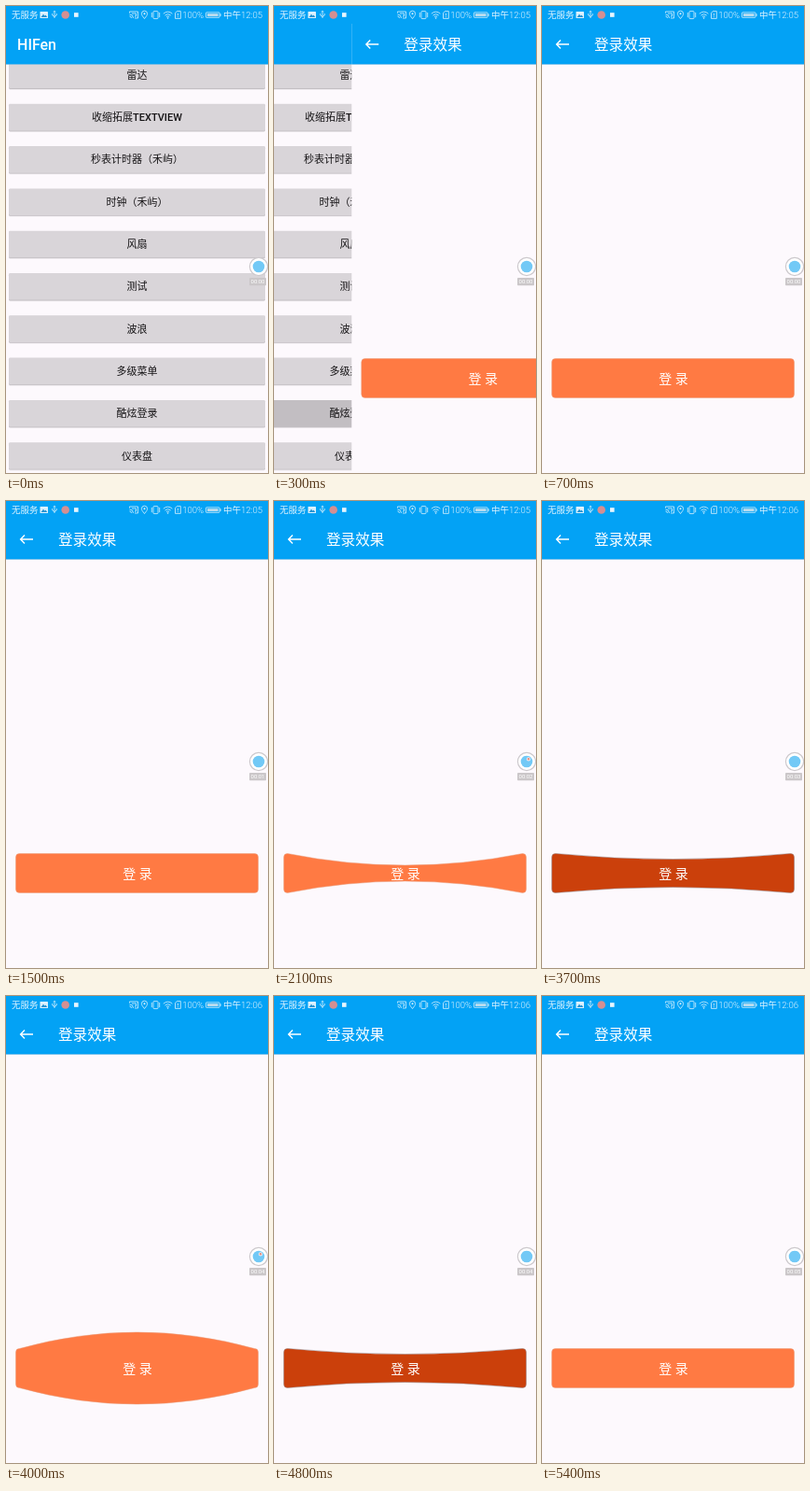
Recreate the animation shown at these times as an HTML page. Size 281 by 500 pixels, loop 5600 ms.

```html
<!DOCTYPE html>
<html lang="zh-CN">
<head>
<meta charset="utf-8">
<title>登录效果</title>
<style>
  html, body { margin: 0; width: 100%; height: 100%; overflow: hidden; background: #fdf9fd; }
  svg { display: block; width: 100vw; height: 100vh; }
  text { font-family: Roboto, "Noto Sans CJK SC", "Noto Sans CJK", sans-serif; fill: #fff; }
  .row { font-size: 11px; font-weight: 500; fill: #161416; text-anchor: middle; }
  .status text { font-size: 9.5px; font-weight: 300; fill: #e3f4fe; }
  .line { fill: none; stroke: #dcf1fd; stroke-width: .8; }
  .solid { fill: #dcf1fd; }
</style>
</head>
<body>
<svg viewBox="0 0 281 500" preserveAspectRatio="none">
  <g id="listPage">
    <rect width="281" height="500" fill="#fdf9fd"/>
    <g id="rows"></g>
    <rect y="62" width="281" height="1" fill="#b9c6d2" opacity=".6"/>
    <rect width="281" height="62.4" fill="#03a2f5"/>
    <text x="12" y="46.5" font-size="16" font-weight="500">HIFen</text>
  </g>

  <g id="loginPage">
    <rect width="281" height="500" fill="#fdf9fd"/>
    <rect y="62" width="281" height="1" fill="#b9c6d2" opacity=".6"/>
    <rect width="281" height="62.4" fill="#03a2f5"/>
    <path d="M29 41H15.8M20 36.6L15.6 41L20 45.4" fill="none" stroke="#fff" stroke-width="1.4"/>
    <text x="56" y="47" font-size="15.6" font-weight="500">登录效果</text>
    <path id="button" stroke-width=".5"/>
    <text x="141" y="404" font-size="14" text-anchor="middle">登 录</text>
  </g>

  <g class="status">
    <rect width="281" height="19" fill="#03a2f5"/>
    <text x="6" y="13">无服务</text>
    <rect class="solid" x="36.5" y="6" width="8.5" height="7" rx=".6"/>
    <path d="M37.5 12L40 8.8L41.6 10.6L42.6 9.6L44.2 12Z" fill="#2593d3"/>
    <path class="line" d="M52 5.5V13M49.8 8V10L52 11.5L54.2 10V8M51 6.5L52 5.2L53 6.5"/>
    <circle cx="63.7" cy="9.5" r="4.3" fill="#d58f92"/>
    <rect x="73" y="7.2" width="4.6" height="4.6" fill="#e6f5fe"/>

    <path class="line" d="M132.5 7.5V6H141.5V13H138M132.5 9a4 4 0 0 1 4 4M132.5 11a2 2 0 0 1 2 2M135 8H139.5V11H138"/>
    <path class="line" d="M148.5 13.6C146.5 11 145.4 9.7 145.4 8.3a3.1 3.1 0 0 1 6.2 0C151.6 9.7 150.5 11 148.5 13.6Z"/>
    <circle class="solid" cx="148.5" cy="8.3" r="1"/>
    <rect class="line" x="158" y="5.6" width="5" height="8" rx=".8"/>
    <path class="line" d="M156.3 7V12.2M164.7 7V12.2"/>
    <path class="line" d="M168.8 8.2Q173.6 4.2 178.4 8.2M170.5 10Q173.6 7.4 176.7 10M172 11.6Q173.6 10.3 175.2 11.6"/>
    <circle class="solid" cx="173.6" cy="13" r=".8"/>
    <path class="line" d="M181.5 7.4L183.3 5.6H187.3V13.4H181.5ZM184.4 7.8V10.4M184.4 11.3V12.2"/>
    <text x="189.3" y="13">100%</text>
    <rect class="line" x="214.4" y="6.9" width="14.6" height="5.4" rx=".6"/>
    <rect x="215.8" y="8.1" width="11.8" height="3" fill="#b9dcef"/>
    <rect class="solid" x="229.4" y="8.4" width="1.1" height="2.4"/>
    <text id="clock" x="233" y="13"></text>
  </g>

  <g>
    <circle cx="271" cy="279" r="9.6" fill="#fff" stroke="#cdc9cd" stroke-width="1.2"/>
    <circle cx="271" cy="279" r="6.3" fill="#72c9f6"/>
    <g id="touchDot">
      <circle cx="273" cy="276.4" r="2.1" fill="#f6f0f3"/>
      <circle cx="273" cy="276.2" r="1.2" fill="#e58f80"/>
    </g>
    <rect x="261" y="291" width="18" height="8.2" rx=".8" fill="#cbc7c9"/>
    <text id="timer" x="270" y="297.4" font-size="6" text-anchor="middle"></text>
  </g>
</svg>

<script>
const LOOP = 5600, STEP = 100;
const LABELS = ["雷达", "收缩拓展TEXTVIEW", "秒表计时器（禾屿）", "时钟（禾屿）", "风扇",
  "测试", "波浪", "多级菜单", "酷炫登录", "仪表盘"];
const TAPPED = 8;

// Bend of the button edges in px (negative is inward), by time before rest.
const SPRING = [[-700, 0], [-600, -6], [-500, -12.5], [-400, 4], [-300, 17.5],
  [-200, 10], [-100, 4], [0, 0]];
const PINCH = [[-600, 0], [-500, -6], [-400, -12.5], [0, 0]];
const PRESSES = [
  { start: 900, end: 1400, keys: PINCH, held: 100 },
  { start: 1900, end: 2600, keys: SPRING, held: 200 },
  { start: 3700, end: 4300, keys: SPRING, held: 100 },
  { start: 4800, end: 5400, keys: SPRING, held: 100 }
];

const get = id => document.getElementById(id);
const [listPage, loginPage, rows, button, clock, touchDot, timer] =
  ["listPage", "loginPage", "rows", "button", "clock", "touchDot", "timer"].map(get);

rows.innerHTML = LABELS.map((label, i) => {
  const y = 73.8 + i * 45.3;
  const box = (dy, fill) =>
    `<rect x="3" y="${y - 14.3 + dy}" width="275" height="28.6" rx="1.4" fill="${fill}"/>`;
  return box(1.6, "#ebe7eb") + box(.8, "#c3bfc3") +
    `<g class="face">${box(0, "#d9d5d9")}</g>` +
    `<text class="row" x="140.5" y="${y + 4}">${label}</text>`;
}).join("");
const tappedFace = rows.querySelectorAll(".face rect")[TAPPED];

function sample(keys, t) {
  const i = keys.findIndex(k => k[0] >= t);
  if (i <= 0) return keys[0][1];
  const [t0, v0] = keys[i - 1], [t1, v1] = keys[i];
  return v0 + (v1 - v0) * (t - t0) / (t1 - t0);
}

function buttonPath(bend) {
  const l = 10.5, r = 270.5, top = 377.5, bottom = 419.5, c = 4, mid = (l + r) / 2;
  return `M${l} ${top + c}Q${l} ${top} ${l + c} ${top}` +
    `Q${mid} ${top - 2 * bend} ${r - c} ${top}Q${r} ${top} ${r} ${top + c}` +
    `V${bottom - c}Q${r} ${bottom} ${r - c} ${bottom}` +
    `Q${mid} ${bottom + 2 * bend} ${l + c} ${bottom}Q${l} ${bottom} ${l} ${bottom - c}Z`;
}

function draw(t) {
  const p = Math.min(1, Math.max(0, (t - 150) / 450));
  const slide = 1 - (1 - p) ** 3;
  listPage.setAttribute("transform", `translate(${-84 * slide} 0)`);
  loginPage.setAttribute("transform", `translate(${281 * (1 - slide)} 0)`);
  tappedFace.setAttribute("fill", t >= 100 ? "#c2bec2" : "#d9d5d9");

  const press = PRESSES.find(q => t >= q.start && t < q.end);
  const bend = press ? sample(press.keys, t - press.end) : 0;
  const held = press && t < press.start + press.held;
  button.setAttribute("d", buttonPath(bend));
  button.setAttribute("fill", held ? "#cb400b" : "#ff7a43");
  button.setAttribute("stroke", held ? "#8f7f80" : "#e89a78");
  touchDot.setAttribute("visibility", press && !held && t < press.end - 100 ? "visible" : "hidden");

  clock.textContent = t < 3300 ? "中午12:05" : "中午12:06";
  timer.textContent = "00:0" + Math.floor(t / 1000);
}

function tick() {
  const t = performance.now() % LOOP;
  draw(Math.floor(t / STEP) * STEP);
  requestAnimationFrame(tick);
}
tick();
</script>
</body>
</html>
```
